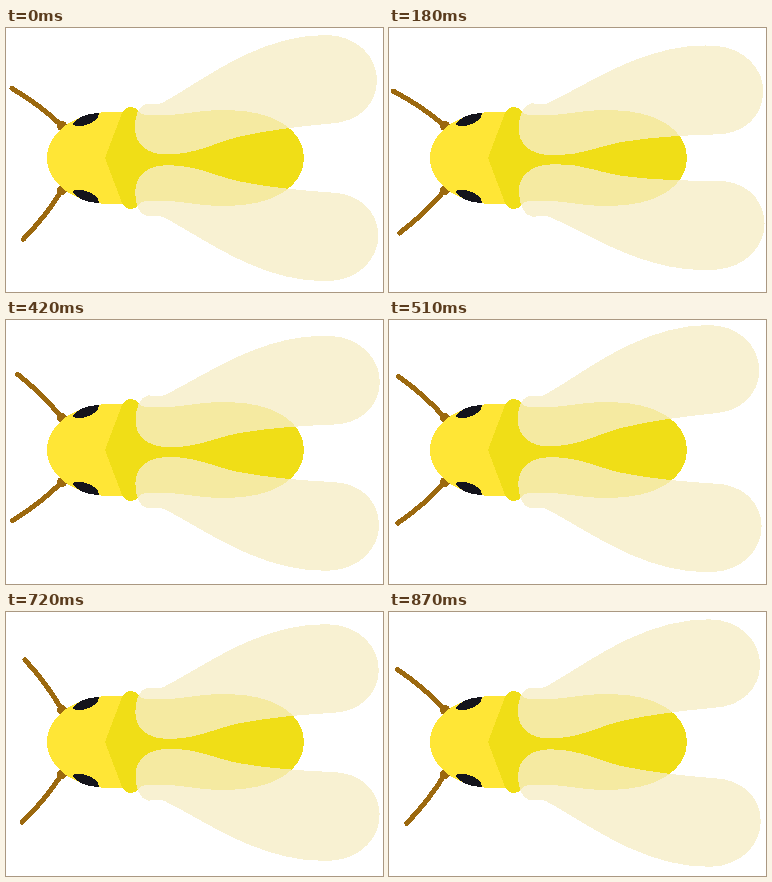
These frames come from a looping animation (377x264 px, 0.9 s). An HTML page:

```html
<!DOCTYPE html>
<html lang="en">
<head>
<meta charset="utf-8">
<title>Fluttering bug</title>
<style>
html, body { margin: 0; width: 100%; height: 100%; overflow: hidden; background: #fff; }
svg { display: block; width: 377px; height: 264px; shape-rendering: crispEdges; }
.feeler { fill: none; stroke: #9c690f; stroke-width: 5; stroke-linecap: round; }
.wing { fill: rgb(246, 237, 198); fill-opacity: .79; }
</style>
</head>
<body>
<svg viewBox="0 0 377 264">
  <defs>
    <g id="feeler">
      <path class="feeler" d="M6 60.5 Q34 77 56 98"/>
      <circle cx="56" cy="98" r="5" fill="#9c690f"/>
    </g>
    <path id="eye" fill="#14141c" d="M67 96 C69 91 80 85 93 85 C94 90 86 96 78 97.5 C72 98.5 67 98 67 96Z"/>
    <path id="wing" class="wing" d="M129 101 C128.5 89 132 78 140 76 C145 75 150 78 157 74.5
      C178 63 209 41 240 26.5 C267 14 293 7 320 7 C350 7 371 28 371 52 C371 76 353 94 325 95.5
      C297 98 262 102 232 109 C208 115 190 126.5 160 126.5 C142 126.5 129.5 117 129 101Z"/>
  </defs>
  <use id="feelerTop" href="#feeler"/>
  <g transform="matrix(1 0 0 -1 0 260)"><use id="feelerLow" href="#feeler"/></g>
  <path fill="#ffe636" d="M122 84 H104 A63 46 0 0 0 104 176 H122Z"/>
  <path fill="#f0de17" d="M99 130 L116 85 C119 78 129 77 132 83 C136 89 150 87 165 87
    C185 85 198 82 220 82 C268 82 298 102 298 130 C298 158 268 178 220 178
    C198 178 185 175 165 173 C150 173 136 171 132 177 C129 183 119 182 116 175Z"/>
  <use href="#eye"/>
  <use href="#eye" transform="matrix(1 0 0 -1 0 260)"/>
  <use id="wingTop" href="#wing"/>
  <g transform="matrix(1 0 0 -1 0 264)"><use id="wingLow" href="#wing"/></g>
</svg>
<script>
const LOOP = 900, STEP = 30;
const FEELER = [56, 98], WING = [150, 111];

// Angle in degrees: a mean plus three looping waves, each [cosine, sine].
const wobble = (mean, ...waves) => phase => waves.reduce((sum, [c, s], i) =>
  sum + c * Math.cos((i + 1) * phase) + s * Math.sin((i + 1) * phase), mean);

const part = (id, pivot, angle) => ({ el: document.getElementById(id), pivot, angle });

const parts = [
  part('feelerTop', FEELER, wobble(4.9, [-1.7, -7], [-1.3, -4.7], [-1.8, .6])),
  part('feelerLow', FEELER, wobble(7.7, [7.4, -4.2], [1, 1], [-1.1, .2])),
  part('wingTop', WING, wobble(2.1, [-1, 2.3], [-1.4, -1.8], [.3, .4])),
  part('wingLow', WING, wobble(2.7, [.1, 1.1], [-1.1, .6], [-.4, .4]))
];

function draw(t) {
  const phase = 2 * Math.PI * t / LOOP;
  for (const { el, pivot, angle } of parts)
    el.setAttribute('transform', `rotate(${angle(phase).toFixed(3)} ${pivot})`);
}

const start = performance.now();
function tick() {
  const t = (performance.now() - start) % LOOP;
  draw(Math.floor(t / STEP) * STEP);
  requestAnimationFrame(tick);
}
draw(0);
requestAnimationFrame(tick);
</script>
</body>
</html>
```
